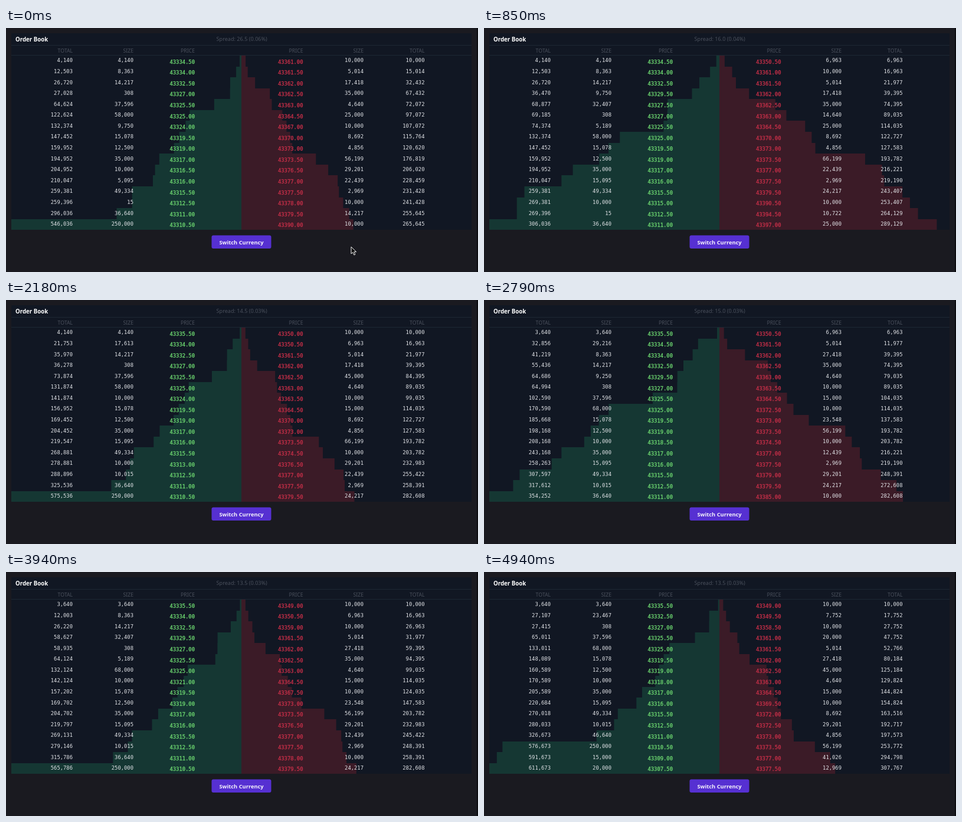
Recreate the animation shown at these times as an HTML page with a canvas. Size 800x416 px, loop 5 s.

```html
<!DOCTYPE html>
<html lang="en">
<head>
<meta charset="utf-8">
<title>Order Book</title>
<style>
  html, body { margin: 0; width: 100%; height: 100%; overflow: hidden; background: #1a1a20; }
  canvas { display: block; }
</style>
</head>
<body>
<canvas id="stage" width="800" height="416"></canvas>
<script>
const ctx = document.getElementById('stage').getContext('2d');

const LOOP = 5000, BASE_PRICE = 43300, ROWS = 16, LOT = 10000;
const ROW_TOP = 47, ROW_HEIGHT = 18.58;
const MIDDLE = 399, HALF_WIDTH = 390;
const SANS = '"Noto Sans", "Open Sans", sans-serif';
const MONO = '8.85px "DejaVu Sans Mono", "Liberation Mono", monospace';
const WHITE = '#e3e5e9', DIM = '#4a505c';

// Moments at which every moving order rests at one price of its path.
const KEY_TIMES = [0, 850, 2180, 2790, 3520, 4300, 4940];
const TICK = 120;

// An order that hops along prices; it appears at key `from`, price 0 withdraws it
// and the last price is kept to the end.
const order = (size, path, from = 0) => ({ size, path, from });

// Prices are offsets from BASE_PRICE.
const bidSide = {
  rank: -1, dir: -1, bar: '#153733', ink: '#6bd46f', price: 320, size: 216, total: 113,
  resting: {
    32.5: 14217, 27: 308, 25.5: 5189, 25: 58000, 19.5: 15078, 19: 12500, 17: 35000,
    16: 5095, 15.5: 49334, 12.5: 15, 11: 36640, 10.5: 250000, 9: 15000
  },
  orders: [
    order(3640, [34.5, 34.5, 35.5]),
    order(500, [34.5, 34.5, 35.5, 0]),
    order(500, [24, 29.5, 0]),
    order(8363, [34, 34, 34, 34, 34, 34, 0]),
    order(9250, [24, 29.5, 34, 29.5, 0, 30, 32.5]),
    order(32407, [25.5, 27.5, 25.5, 25.5, 25.5, 29.5, 25.5]),
    order(29216, [34.5, 34.5, 0], 3),
    order(20000, [10, 10, 7.5], 4),
    order(LOT, [16.5, 15, 24, 18.5, 0, 21, 18]),
    order(LOT, [16], 1),
    order(LOT, [12.5], 2),
    order(LOT, [13, 25], 2),
    order(LOT, [11], 6)
  ]
};
const askSide = {
  rank: 1, dir: 1, bar: '#3b1b27', ink: '#c52f48', price: 503.5, size: 606, total: 709.5,
  resting: {
    61.5: 5014, 62: 17418, 62.5: 35000, 63: 4640, 64.5: 15000, 73: 4856,
    73.5: 56199, 77: 12439, 77.5: 2969, 79.5: 14217, 94.5: 10722, 97: 25000
  },
  orders: [
    order(6963, [50.5, 50.5, 50.5, 50.5, 50.5, 0], 1),
    order(7752, [49.5], 5),
    order(8692, [70, 70, 70, 73, 73, 73, 72]),
    order(29201, [76.5, 0, 76.5, 79, 0, 76.5, 72.5]),
    order(28587, [77], 5),
    order(LOT, [49], 5),
    order(LOT, [61, 61, 50, 62]),
    order(LOT, [64.5, 64.5, 62.5, 63.5, 61, 59, 58.5]),
    order(LOT, [67, 63, 63.5, 72.5, 67.5, 71.5, 69.5]),
    order(LOT, [77, 77, 77, 73, 73, 73, 62.5]),
    order(LOT, [78, 73.5, 73.5, 74.5, 78, 77.5]),
    order(LOT, [79.5, 79.5, 79.5, 79.5, 61], 1),
    order(LOT, [90, 90.5, 74.5, 85, 89, 61])
  ]
};

function random(seed) {
  const x = Math.sin(seed * 127.1 + 11.7) * 43758.5453;
  return x - Math.floor(x);
}

function priceAtKey({ path, from }, key) {
  return key < from ? 0 : path[key - from] ?? path.at(-1);
}

// Between two keys an order flickers from one price to the next, ever more often at the next.
function priceAt(item, seed, t) {
  const phase = random(seed) * TICK;
  const tick = Math.floor((t + phase) / TICK);
  const start = tick * TICK - phase;
  const resting = KEY_TIMES.findIndex(k => k >= start && k < start + TICK);
  if (resting >= 0) return priceAtKey(item, resting);

  const key = KEY_TIMES.findLastIndex(k => k <= start);
  if (key === KEY_TIMES.length - 1) return priceAtKey(item, key);
  const p = (start - KEY_TIMES[key]) / (KEY_TIMES[key + 1] - KEY_TIMES[key]);
  const chance = p * p * (3 - 2 * p);
  return priceAtKey(item, random(seed * 57 + tick) < chance ? key + 1 : key);
}

function rowsAt({ resting, orders, rank }, t) {
  const levels = { ...resting };
  orders.forEach((item, i) => {
    const price = priceAt(item, i + 1 + rank * 20, t);
    if (price) levels[price] = (levels[price] ?? 0) + item.size;
  });
  let total = 0;
  return Object.entries(levels)
    .sort((a, b) => rank * (a[0] - b[0]))
    .slice(0, ROWS)
    .map(([price, size]) => ({ price: BASE_PRICE + Number(price), size, total: total += size }));
}

function rect(x, y, w, h, color) {
  ctx.fillStyle = color;
  ctx.fillRect(x, y, w, h);
}

function text(str, x, y, font, color, align = 'right') {
  ctx.font = font;
  ctx.fillStyle = color;
  ctx.textAlign = align;
  ctx.fillText(str, x, y);
}

function drawSide(side, rows, maxTotal) {
  const rowY = i => Math.round(ROW_TOP + i * ROW_HEIGHT);
  rows.forEach(({ total }, i) => {
    const width = side.dir * HALF_WIDTH * total / maxTotal;
    rect(MIDDLE, rowY(i), width, rowY(i + 1) - rowY(i), side.bar);
  });
  rows.forEach(({ price, size, total }, i) => {
    const y = ROW_TOP + i * ROW_HEIGHT + 11.4;
    text(total.toLocaleString('en-US'), side.total, y, MONO, WHITE);
    text(size.toLocaleString('en-US'), side.size, y, MONO, WHITE);
    text(price.toFixed(2), side.price, y + 2.2, MONO, side.ink);
    ctx.strokeStyle = side.ink;
    ctx.lineWidth = 0.35;
    ctx.strokeText(price.toFixed(2), side.price, y + 2.2);
  });
  for (const column of ['total', 'size', 'price'])
    text(column.toUpperCase(), side[column], 41.8, `500 8.7px ${SANS}`, DIM);
}

function drawButton() {
  ctx.fillStyle = '#5630d2';
  ctx.beginPath();
  ctx.roundRect(348.5, 353.5, 101, 22.5, 3);
  ctx.fill();
  text('Switch Currency', 399, 368.7, `600 9.3px ${SANS}`, '#f4f2fc', 'center');
}

function drawCursor(x, y) {
  const arrow = new Path2D('M0 0V12L2.8 9.4L4.9 14L6.9 13.1L4.9 8.7H8.7Z');
  ctx.save();
  ctx.translate(x, y);
  ctx.fillStyle = '#111';
  ctx.strokeStyle = '#f2f2f2';
  ctx.lineWidth = 1;
  ctx.fill(arrow);
  ctx.stroke(arrow);
  ctx.restore();
}

function draw(t) {
  const bids = rowsAt(bidSide, t), asks = rowsAt(askSide, t);
  const maxTotal = Math.max(bids.at(-1).total, asks.at(-1).total);
  const spread = asks[0].price - bids[0].price;
  const percent = (spread * 100 / asks[0].price).toFixed(2);

  rect(0, 0, 800, 416, '#1a1a20');
  rect(798, 0, 2, 416, '#0c0c0f');
  rect(9, 9, 780, 335, '#111723');
  rect(9, 29, 780, 1, '#1d2733');
  rect(9, 46, 780, 1, '#1d2733');
  text('Order Book', 16, 23, `600 9.7px ${SANS}`, '#fff', 'left');
  text(`Spread: ${spread.toFixed(1)} (${percent}%)`, 399.7, 21.8, `500 9.1px ${SANS}`, DIM, 'center');
  drawSide(bidSide, bids, maxTotal);
  drawSide(askSide, asks, maxTotal);
  drawButton();

  if (t < 700) drawCursor(585, 373);
  if (t >= 4200 && t < 4390) {
    const rise = Math.min(1, (t - 4200) / 90);
    drawCursor(749.5, 368 - 30 * rise);
  }
}

function frame() {
  draw(performance.now() % LOOP);
  requestAnimationFrame(frame);
}
frame();
</script>
</body>
</html>
```
